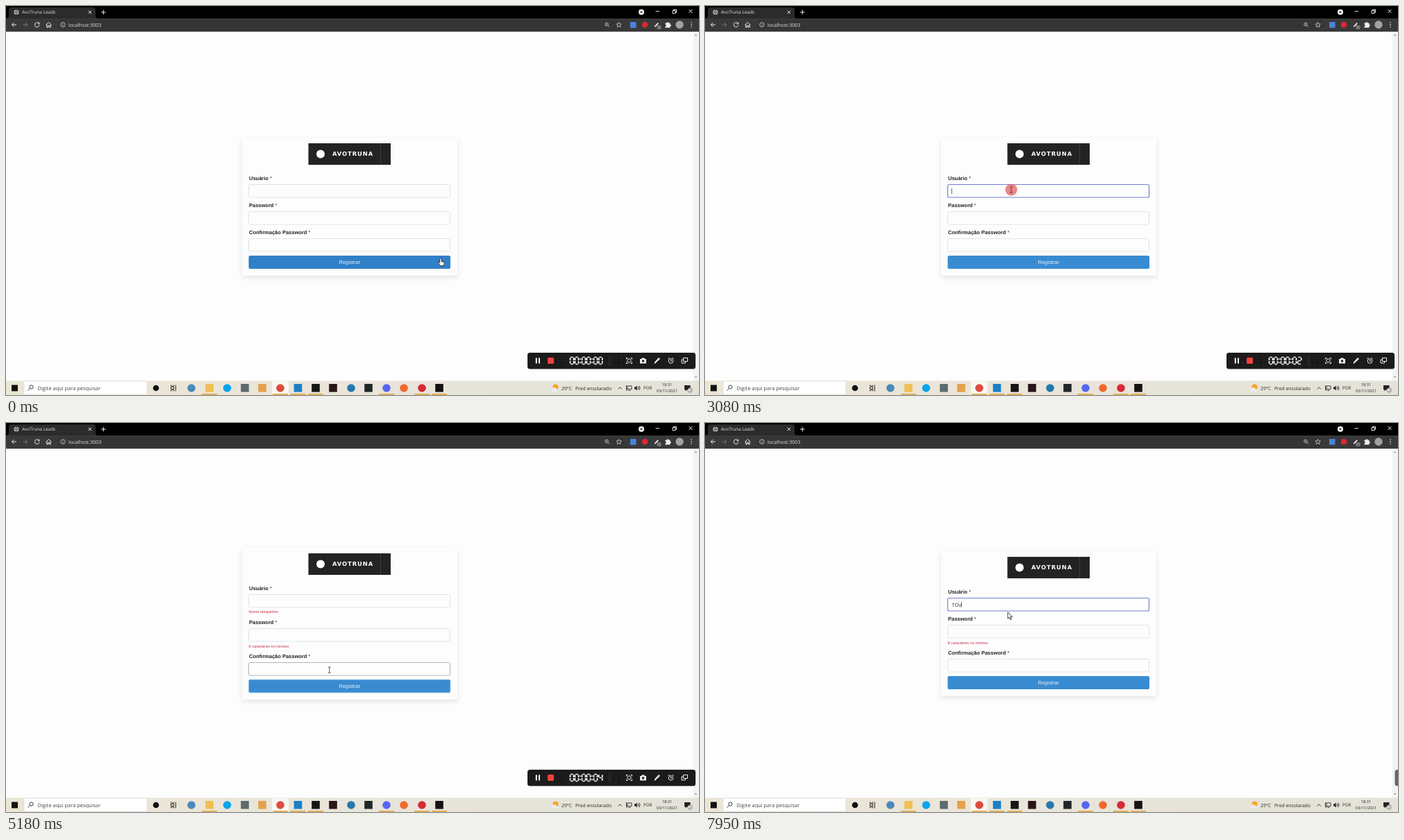
Recreate the animation shown at these times as an HTML page. Size 998 by 561 pixels, loop 7.99 s.

```html
<!DOCTYPE html>
<html lang="pt">
<head>
<meta charset="utf-8">
<title>Registro</title>
<style>
  html, body { margin: 0; width: 100%; height: 100%; overflow: hidden; background: #fdfdfd; }
  svg { display: block; text-rendering: geometricPrecision; }
  text { font-family: "Open Sans", "Noto Sans", sans-serif; white-space: pre; }
  .form text { font: 7.5px "Liberation Sans", Arial, sans-serif; fill: #222; }
  .form .label { font-weight: bold; }
  .form .star { font-weight: normal; fill: #333; }
  .form .error { font-size: 5.55px; fill: #c2304a; }
  .form .brand { font: bold 8.4px "DejaVu Sans", sans-serif; letter-spacing: .9px; fill: #fff; }
  .field { fill: #fdfdfd; }
  .line { fill: none; stroke: #eee; stroke-width: 1; }
  .soft { stroke: #b8b8b8; }
  .dark { fill: none; stroke: #222; stroke-width: .9; }
</style>
</head>
<body>
<svg width="998" height="561" viewBox="0 0 998 561">
  <defs>
    <linearGradient id="barFill">
      <stop offset="0" stop-color="#ebe6d4"/><stop offset=".5" stop-color="#e9e5da"/><stop offset="1" stop-color="#e4e2d8"/>
    </linearGradient>
    <filter id="shadow" x="-10%" y="-10%" width="120%" height="125%">
      <feDropShadow dx="0" dy="3" stdDeviation="3.5" flood-color="#000" flood-opacity=".1"/>
    </filter>
  </defs>
  <rect width="998" height="561" fill="#fdfdfd"/>

  <!-- browser -->
  <rect width="998" height="19" fill="#000"/>
  <path d="M0 18q4 0 4-4V6q0-4 4-4H125q4 0 4 4v8q0 4 4 4z" fill="#2b2b2c"/>
  <rect y="18" width="998" height="19" fill="#39393a"/>
  <rect x="74" y="20" width="816" height="14.5" rx="7.2" fill="#353536"/>
  <circle cx="15" cy="9" r="3.6" fill="#c4c6c9"/>
  <path d="M11.5 9h7M15 5.5q-3 3.5 0 7q3-3.5 0-7" fill="none" stroke="#35363a" stroke-width=".7"/>
  <text x="23" y="11.3" font-size="6.5" fill="#e3e5e8">AvoTruna Leads</text>
  <path class="line" d="M118.7 6.7l4.4 4.4m0-4.4l-4.4 4.4M137 9h6.6M140.3 5.700v6.6M935.5 7.8h5.5M960 6.7h4v4h-4zM961.5 6.700v-1.500h4v4h-1.5M983.5 5l5 5m0-5l-5 5"/>
  <circle cx="915" cy="8.8" r="4" fill="#fff"/><path d="M913 8l2 2.2 2-2.2z" fill="#000"/>
  <path class="line" d="M15 27H8.5m3-3l-3 3 3 3M47.3 25a3.3 3.3 0 1 0 .7 2.5M48 23.5v2.3h-2.3M57.5 27.3l4-3.8 4 3.8M58.8 26.5v4.2h1.800v-2.500h1.800v2.500h1.800v-4.2"/>
  <path class="line" d="M24.5 27H31m-3-3l3 3-3 3" style="stroke:#77797d"/>
  <circle class="line soft" cx="82" cy="27" r="3.3"/><path class="line soft" d="M82 26.500v2.300M82 24.700v.9"/>
  <text x="90" y="29.7" font-size="7" fill="#e3e5e8">localhost:3003</text>
  <circle class="line soft" cx="865" cy="26.3" r="2.3"/><path class="line soft" d="M866.7 28l2.5 2.5M864 26.3h2"/>
  <path class="line soft" d="M882.7 23.3l1.1 2.5 2.7.2-2.1 1.8.7 2.7-2.4-1.5-2.4 1.5.7-2.7-2.1-1.8 2.7-.2z"/>
  <rect x="899" y="23" width="8.5" height="8.5" fill="#4a83dc"/>
  <circle cx="920" cy="27" r="4.3" fill="#dc2832"/>
  <path d="M933.5 29.5l5-5.5 1.5 1.5-5 5z" fill="#ddd"/><rect x="937.5" y="28" width="6" height="5.5" rx="1" fill="#777"/>
  <path d="M949.5 24.5h2.2a1.3 1.3 0 0 1 2.600 0h2.200v2.200a1.3 1.3 0 0 1 0 2.600v2h-7v-2a1.3 1.3 0 0 0 0-2.600z" fill="#eee"/>
  <circle cx="970" cy="27" r="5.7" fill="#a5a19e"/>
  <path d="M987 23.2v8" stroke="#eee" stroke-width="1.4" stroke-dasharray="1.4 1.7"/>
  <rect x="989.5" y="37" width="8.5" height="504" fill="#f3f3f1"/>
  <path d="M991.5 43l2-2.5 2 2.5zM991.5 534l2 2.5 2-2.5z" fill="#a5a5a5"/>

  <!-- form -->
  <g class="form">
    <rect id="card" x="340" width="310" rx="3" fill="#fdfdfd" filter="url(#shadow)"/>
    <g id="top">
      <rect x="435.5" y="198" width="118.500" height="31" fill="#232323"/>
      <path d="M539.5 198v31" stroke="#3c3c38"/>
      <circle cx="453" cy="213.5" r="6" fill="#fff"/>
      <text class="brand" x="470" y="216.3">AVOTRUNA</text>
      <text class="label" x="350" y="250.7">Usuário <tspan class="star">*</tspan></text>
      <rect class="field" x="349.5" y="257.5" width="290" height="18.5" rx="2"/>
      <text id="typed" x="355" y="269.5" style="fill:#444"></text>
      <path id="caret" d="M0 263v8" stroke="#333" stroke-width=".8"/>
      <text id="nameError" class="error" x="349.5" y="284.3">Nome obrigatório</text>
    </g>
    <g id="middle">
      <text class="label" x="350" y="289.7">Password <tspan class="star">*</tspan></text>
      <rect class="field" x="349.5" y="296.5" width="290" height="18.5" rx="2"/>
      <text id="passError" class="error" x="349.5" y="323.5">8 caracteres no mínimo</text>
    </g>
    <g id="bottom">
      <text class="label" x="350" y="328.8">Confirmação Password <tspan class="star">*</tspan></text>
      <rect class="field" x="349.5" y="335.5" width="290" height="18.5" rx="2"/>
      <rect id="button" x="349.5" y="360" width="290.5" height="19" rx="2" stroke="#a6cbee"/>
      <text x="479.5" y="372" style="fill:#e9f2fa">Registrar</text>
    </g>
  </g>

  <!-- screen recorder -->
  <g id="recorder">
    <rect x="751" y="500" width="242" height="23.5" rx="3.5" fill="#1b1b1b"/>
    <path d="M763.8 507.5v8M768 507.5v8" stroke="#fff" stroke-width="2"/>
    <rect x="780" y="507" width="9" height="9" rx="1.5" fill="#f2413d"/>
    <path d="M800.5 502v19M882.5 502v19" stroke="#111"/>
    <path id="timer" fill="none" stroke="#fff" stroke-width="1.65"/>
    <path id="meter" d="M869.5 505v14" stroke-width="4.5" stroke-dasharray="1.3 .7"/>
    <g class="line">
      <path d="M893.5 509.500v-2h2M899.5 507.5h2v2M901.5 513.500v2h-2M895.5 515.5h-2v-2"/><circle cx="897.5" cy="511.5" r="2.6"/>
      <path d="M934 515.5l1-2.5 5-5.5 1.5 1.5-5.5 5z" fill="#ddd"/>
      <circle cx="957.5" cy="512" r="3.3"/><path d="M957.5 510v2.200h1.5M953.5 509l2-2M961.5 509l-2-2"/>
      <path d="M975.5 507.5h6v5h-6zM975.5 510h-2.500v5h5.500v-2.5"/>
    </g>
    <path d="M913 509h2l1-1.5h3l1 1.5h2v6.500h-9z" fill="#eee"/><circle cx="917.5" cy="512" r="1.7" fill="#1b1b1b"/>
  </g>

  <!-- taskbar -->
  <rect y="540.5" width="998" height="20.5" fill="url(#barFill)"/>
  <rect x="26" y="541" width="177" height="19.5" fill="#fff" stroke="#d0d3d6" stroke-width=".6"/>
  <rect x="8" y="546.5" width="9" height="9" fill="#111"/>
  <circle class="dark" cx="36.5" cy="549.5" r="2.6"/><path class="dark" d="M34.6 551.5l-3 3.2"/>
  <text x="45.5" y="553.5" font-size="7.45" fill="#444">Digite aqui para pesquisar</text>
  <circle cx="216" cy="551" r="4.3" fill="#111"/>
  <path class="dark" d="M237.5 546.500v1.500h4.500v-1.5M237.5 549.5h4.500v3h-4.5zM237.5 555.500v-1.500h4.500v1.5M244.5 546.500v9"/>
  <rect x="383" y="541" width="24" height="20" fill="#f8f7f2"/>
  <g id="apps"></g>
  <circle cx="791.5" cy="549.5" r="4" fill="#f5a623"/><path d="M786.5 556a2.3 2.3 0 0 1 1-4.3 3 3 0 0 1 5.5.8 1.8 1.8 0 0 1 .5 3.5z" fill="#e9edf2"/>
  <g fill="#222">
    <text x="800" y="553.5" font-size="6.8">29°C</text>
    <text x="820" y="553.5" font-size="6.8">Pred ensolarado</text>
    <text x="918" y="553" font-size="6.2">POR</text>
    <text x="952" y="548" font-size="5.65" text-anchor="middle">18:31</text>
    <text x="952" y="557.3" font-size="5.65" text-anchor="middle">03/11/2021</text>
    <path d="M905 549.5h1.5l2.2-2v7l-2.2-2H905zM977 547h8.500v6.500h-5l-2 2v-2H977z"/>
  </g>
  <path class="dark" d="M881.5 552.5l2.7-2.7 2.7 2.7M895 548h6v4.500h-6zM893.5 547v7h2M896.5 554.5h3M910.2 549q1.5 2 0 4M911.8 547.8q2.5 3.2 0 6.4"/>
  <circle cx="985" cy="554" r="3.2" fill="#eee" stroke="#333" stroke-width=".6"/>
  <text x="985" y="555.8" font-size="4.8" text-anchor="middle">1</text>

  <circle id="ripple" fill="#e23c3c" fill-opacity=".62"/>
  <path id="cursor" stroke-width=".8" stroke-linejoin="round"/>
</svg>
<script>
const LOOP = 7990, ROW = 10.3;
const el = Object.fromEntries([...document.querySelectorAll('[id]')].map(e => [e.id, e]));
const fields = [...document.querySelectorAll('.field')];
const set = (e, attrs) => { for (const k in attrs) e.setAttribute(k, attrs[k]); };
const show = (e, on) => set(e, { visibility: on ? 'visible' : 'hidden' });
const within = (t, a, b) => t >= a && t < b;
const progress = (t, a, b) => Math.min(1, Math.max(0, (t - a) / (b - a)));

// x, shape, colour, running
const apps = [
  [267, 'o', '#4a8abc'], [293, 's', '#f0c050', 1], [318.5, 'o', '#08a5ea'], [344, 's', '#5d6b70'],
  [369, 's', '#e6a04c'], [395, 'o', '#dd4b3e', 1], [420.5, 's', '#1b7fc6', 1], [446, 's', '#161616', 1],
  [471, 's', '#2a1517'], [497, 'o', '#2479ad'], [522, 's', '#202628'], [548, 'o', '#5865f2', 1],
  [573, 'o', '#f2682c'], [599, 'o', '#d62b36', 1], [624, 's', '#171112', 1]
];
el.apps.innerHTML = apps.map(([x, shape, fill, running]) =>
  (shape === 'o' ? `<circle cx="${x}" cy="551" r="5.8" fill="${fill}"/>`
    : `<rect x="${x - 5.8}" y="545" width="11.6" height="11.6" fill="${fill}"/>`) +
  (running ? `<path d="M${x - 11} 560h22" stroke="#e5a13a" stroke-width="1.6"/>` : '')).join('');

// t, x, y of the pointer's hot spot
const path = [
  [0, 626, 364], [560, 626, 364], [900, 495, 301], [1050, 447, 271], [1310, 447, 271], [1390, 441, 265],
  [3380, 441, 265], [4160, 476, 375], [5100, 476, 375], [5590, 414, 261], [5870, 426, 254],
  [6300, 426, 254], [6700, 436, 272], [6790, 436, 272], [7050, 436, 272.7], [LOOP, 436, 272.7]
];
const clicks = [2810, 4405, 5870], CLICK = 380;
const keys = [[7220, 'T'], [7560, 'O'], [7910, 'v']];

const cursors = {
  hand: ['M-1.3 1a1.2 1.2 0 0 1 2.4 0v3.5l3.2.8q1.2.4 1 1.8l-.8 3.4h-5l-3-4q-.6-1.4.8-1.2l1.4 1.2z', '#fff', '#111'],
  beam: ['M-2-4h4M0-4v8M-2 4h4', 'none', '#333'],
  arrow: ['M0 0v9.5l2.2-2 1.6 3.6 1.5-.7-1.6-3.5h3z', '#fff', '#111']
};

const segments = {
  a: 'M.8 0h3.4', b: 'M5 .8v3.6', c: 'M5 5.6v3.6', d: 'M.8 10h3.4', e: 'M0 5.6v3.6', f: 'M0 .8v3.6', g: 'M.8 5h3.4'
};
const digits = ['abcdef', 'bc', 'abdeg', 'abcdg', 'bcfg', 'acdfg'];
const digit = (x, n) => [...digits[n]].map(s =>
  segments[s].replace(/M(\S+) (\d*\.?\d+)/, (_, px, py) => `M${x + +px} ${506.5 + +py}`)).join('');
const clock = n => [812.5, 819.5, 829.5, 836.5, 846.5].map(x => digit(x, 0)).join('') + digit(853.7, n) +
  [827, 844].map(x => `M${x} 508.5v1.6M${x} 513.5v1.6`).join('');

function pointer(t) {
  const i = path.findIndex(k => k[0] > t);
  const [t0, x0, y0] = path[i - 1], [t1, x1, y1] = path[i], p = progress(t, t0, t1);
  return [x0 + (x1 - x0) * p, y0 + (y1 - y0) * p];
}

function draw(t) {
  // layout: each error adds a row to the vertically centred card, snapped to whole pixels
  const submitted = t >= 4600;
  const nameError = submitted && t < keys[0][0], passError = submitted;
  const rows = nameError + passError, rise = -rows * ROW / 2;
  const shifts = [rise, rise + nameError * ROW, rise + rows * ROW].map(Math.round);
  const [top, , bottom] = shifts;
  ['top', 'middle', 'bottom'].forEach((id, i) => set(el[id], { transform: `translate(0 ${shifts[i]})` }));
  set(el.card, { y: 190 + top, height: 198.5 + bottom - top });
  show(el.nameError, nameError);
  show(el.passError, passError);

  const [x, y] = pointer(t);
  const over = (y0, h) => x > 350 && x < 640 && y >= y0 && y <= y0 + h;
  const hovered = shifts.findIndex((s, i) => over(257.5 + 39 * i + s, 18.5));
  const onButton = over(360 + bottom, 19);
  const nameFocus = within(t, 2850, 4405) || t >= 5910;
  fields.forEach((f, i) => {
    const focus = i === 0 && nameFocus;
    f.style.stroke = focus ? '#7681cb' : i === hovered ? '#b4b4ba' : '#e0e3e8';
    f.style.strokeWidth = focus ? 1.2 : 1;
  });
  set(el.button, { fill: onButton ? '#3080c8' : '#398bd1', 'stroke-width': within(t, 4560, 5910) ? 1 : 0 });

  // typing and caret
  const typed = keys.filter(k => t >= k[0]);
  el.typed.textContent = typed.map(k => k[1]).join('');
  const since = typed.length ? typed.at(-1)[0] : t < 5910 ? 2850 : 5910;
  show(el.caret, nameFocus && (t - since) % 1000 < 500);
  const width = typed.length ? el.typed.getComputedTextLength() : 0;
  set(el.caret, { transform: `translate(${355.3 + width} 0)` });

  // recorder
  const p = progress(t, 5285, 5830), eased = p < .5 ? 2 * p * p : 1 - 2 * (1 - p) ** 2;
  set(el.recorder, { transform: `translate(${242.5 * eased} 0)`, opacity: 1 - .35 * progress(t, 5930, 7050) });
  set(el.timer, { d: clock(Math.min(5, Math.max(0, Math.floor((t - 530) / 1005)))) });
  const loud = within(t, 560, 1390) || within(t, 2330, 2550) || within(t, 3400, 5100);
  set(el.meter, { stroke: loud ? '#34484a' : '#2b2b2b' });

  // pointer and click ring
  const start = clicks.find(c => within(t, c, c + CLICK));
  const radius = start ? 15 * (1 - Math.abs(2 * (t - start) / CLICK - 1)) : 0;
  set(el.ripple, { cx: x, cy: y, r: radius });
  const [d, fill, stroke] = cursors[onButton ? 'hand' : hovered >= 0 ? 'beam' : 'arrow'];
  set(el.cursor, { d, fill, stroke, transform: `translate(${x} ${y})` });
}

function tick() {
  draw(performance.now() % LOOP);
  requestAnimationFrame(tick);
}
tick();
</script>
</body>
</html>
```
